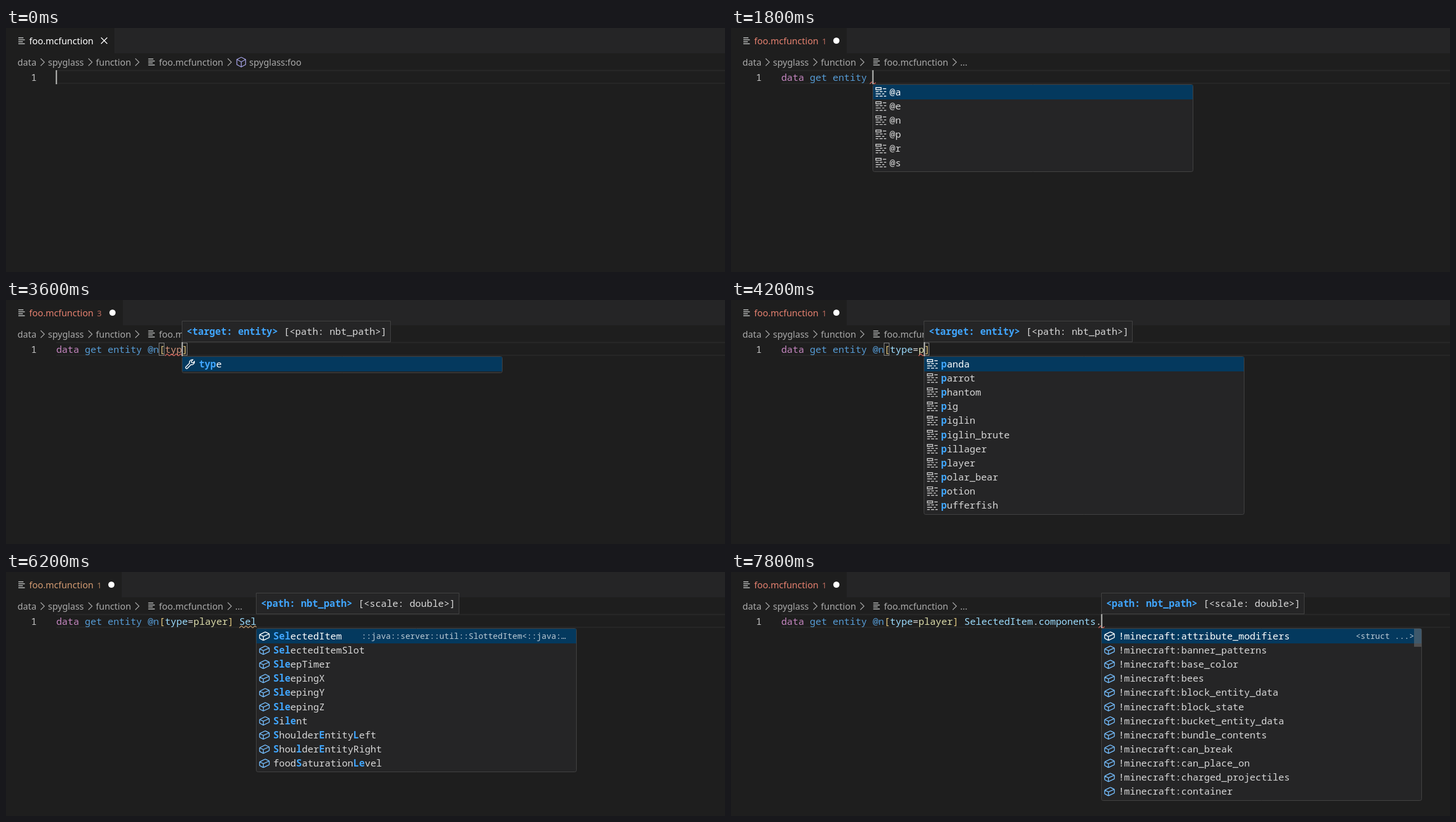
Write an HTML page with a canvas that moves like this. It is 1280 by 434 pixels and loops after 8000 ms.

```html
<!DOCTYPE html>
<html lang="en">
<head>
<meta charset="utf-8">
<title>Command completion</title>
<style>
html, body { margin: 0; width: 100%; height: 100%; overflow: hidden; background: #1e1e1e; }
canvas { display: block; width: 1280px; height: 434px; }
</style>
</head>
<body>
<canvas id="stage" width="1280" height="434"></canvas>
<script>
const ctx = document.getElementById('stage').getContext('2d');
const STEP = 200, LOOP = 8000;
const LEFT = 89.4, ADV = 10.183, ROW = 25.14;
const UI = '"Noto Sans", "Open Sans", sans-serif';
const MONO = '"Noto Sans Mono", "DejaVu Sans Mono", monospace';
const CODE = `16.97px ${MONO}`, BOLD = `bold 16.97px ${MONO}`;
const HIT = '#40a6ff', PLAIN = '#d8d8d8', RED = '#e4806f', AMBER = '#d39b72';
const colX = c => LEFT + c * ADV;

// Syntax colours: each applies up to the given column.
const SPANS = [
  [4, '#c586c0'], [18, '#569cd6'], [19, '#e3c87f'], [23, '#9cdcfe'],
  [24, PLAIN], [30, '#dcdcaa'], [31, '#e3c87f'], [99, '#9cdcfe']
];

const words = s => s.split(' ');
const TARGET = ['<target: entity>', ' [<path: nbt_path>]'];
const PATH = ['[<path: nbt_path>]', ''];
const SCALE = ['<path: nbt_path>', ' [<scale: double>]'];
const SUBS = ['(get|merge|modify|remove)', '(block|entity|storage)'];
const SELECTORS = words('@a @e @n @p @r @s');
const MARKED = SELECTORS.map(s => '*@*' + s[1]);
const KEYS = words('advancements distance dx dy dz gamemode level limit name nbt predicate scores');
const MOBS = words('acacia_boat allay area_effect_cloud armadillo armor_stand arrow axolotl bat bee blaze block_display bogged');
const FIELDS = words('AbsorptionAmount Air Brain CustomName DataVersion DeathTime Dimension EnderItems FallDistance FallFlying Fire Glowing');
const ITEM = words('id Slot components count');
const PARTS = words('attribute_modifiers banner_patterns base_color bees block_entity_data block_state bucket_entity_data bundle_contents can_break can_place_on charged_projectiles container').map(s => '!minecraft:' + s);

const E = 'data get entity ', P = E + '@n[type=player]', I = P + ' SelectedItem';
const bad = { tone: RED, n: 1 };
const warn = { tone: AMBER, n: 1, waveTone: '#c8a070' };
const st = (text, more) => ({ text, caret: text.length, blink: true, dirty: true, ...more });
const inside = (body, more) => st(E + '@n[' + body + ']', { caret: 19 + body.length, pair: true, tip: TARGET, ...more });
const keyword = (text, rows, more) => st(text, { ...bad, icon: 'keyword', rows: words(rows), ...more });
const done = more => st(P, { caret: 30, tip: TARGET, pair: true, ...more });
const field = (text, rows, more) => st(text, { tip: SCALE, icon: 'field', rows, ...more });
const itemStep = (sel, more) => field(I + '.', ITEM, { ...bad, sel, wave: [45, 45], ...more });

const STATES = [
  st('', { dirty: false }),
  keyword('d', '*d*amage *d*ata *d*atapack *d*ebug *d*efaultgamemode *d*eop *d*ifficulty', { wave: [0, 1], raw: 0 }),
  keyword('da', '*da*mage *da*ta *da*tapack *d*ef*a*ultgamemode', { wave: [0, 2], raw: 0 }),
  keyword('dat', '*dat*a *dat*apack', { wave: [0, 3], raw: 0 }),
  keyword('data', '*data* *data*pack', { wave: [4, 4] }),
  keyword('data ', 'get merge modify remove', { wave: [5, 5], tip: SUBS, tall: true }),
  keyword('data g', '*g*et', { wave: [5, 6], raw: 5, tip: SUBS, tall: true }),
  keyword('data get ', 'block entity storage', { wave: [9, 9] }),
  keyword('data get e', '*e*ntity', { wave: [9, 10], raw: 9 }),
  keyword(E, SELECTORS.join(' '), { wave: [16, 16] }),
  ...[0, 1, 2].map(sel => keyword(E + '@', MARKED.join(' '), { sel, wave: [16, 17], raw: 16 })),
  st(E + '@n', { tip: TARGET }),
  inside('', { icon: 'wrench', rows: KEYS }),
  inside('', { icon: 'wrench', rows: KEYS, blink: false }),
  inside('t', { ...bad, n: 3, icon: 'wrench', rows: words('*t*ag *t*eam *t*ype'), wave: [19, 20], raw: 19, rawTo: 20 }),
  inside('ty', { ...bad, n: 3, icon: 'wrench', rows: ['*ty*pe'], wave: [19, 21], raw: 19, rawTo: 21 }),
  inside('typ', { ...bad, n: 3, icon: 'wrench', rows: ['*typ*e'], wave: [19, 22], raw: 19, rawTo: 22 }),
  inside('type', { ...bad, wave: [23, 23] }),
  inside('type=', { ...bad, icon: 'keyword', rows: MOBS, wave: [24, 24] }),
  inside('type=p', { ...bad, icon: 'keyword', rows: words('*p*anda *p*arrot *p*hantom *p*ig *p*iglin *p*iglin_brute *p*illager *p*layer *p*olar_bear *p*otion *p*ufferfish'), wave: [24, 25] }),
  inside('type=pl', { ...bad, icon: 'keyword', rows: words('*pl*ayer *p*ig*l*in *p*ig*l*in_brute *p*i*l*lager *p*o*l*ar_bear'), wave: [24, 26] }),
  done(),
  done({ blink: false }),
  done({ caret: 31 }),
  st(P + ' ', { ...bad, tip: PATH, wave: [32, 32], blink: false }),
  st(P + ' ', { ...bad, tip: PATH, wave: [32, 32], blink: false }),
  field(P + ' ', FIELDS, { ...bad, tip: PATH, wave: [32, 32] }),
  field(P + ' S', words('*S*core *S*electedItem *S*electedItemSlot *S*houlderEntityLeft *S*houlderEntityRight *S*ilent *S*leepingX *S*leepingY *S*leepingZ *S*leepTimer seenCredit*S* food*S*aturationLevel'), { ...warn, wave: [32, 33] }),
  field(P + ' Se', words('*Se*lectedItem *Se*lectedItemSlot *S*cor*e* *S*l*e*epTimer *S*l*e*epingX *S*l*e*epingY *S*l*e*epingZ *S*il*e*nt *S*houlder*E*ntityLeft *S*houlder*E*ntityRight food*S*aturationL*e*vel'), { ...warn, wave: [32, 34] }),
  field(P + ' Sel', words('*Sel*ectedItem *Sel*ectedItemSlot *Sle*epTimer *Sle*epingX *Sle*epingY *Sle*epingZ *S*i*le*nt *S*houlder*E*ntity*L*eft *S*hou*l*der*E*ntityRight food*S*aturation*Le*vel'), {
    ...warn, wave: [32, 35], blink: false,
    detail: '::java::server::util::SlottedItem<::java:…', detailEnd: 551 }),
  field(I, null),
  field(I, null, { blink: false }),
  itemStep(0),
  itemStep(0, { blink: false }),
  itemStep(1, { detail: '::java::server::util::inventory::T', blink: false }),
  itemStep(2),
  field(I + '.components', null),
  field(I + '.components.', PARTS, { ...bad, wave: [56, 56], detail: '<struct ...>', bar: true })
];

function text(s, x, y, color, font) {
  ctx.font = font;
  ctx.fillStyle = color;
  ctx.fillText(s, x, y);
}

function rect(x, y, w, h, color) {
  ctx.fillStyle = color;
  ctx.fillRect(x, y, w, h);
}

function line(color, width, ...pts) {
  ctx.strokeStyle = color;
  ctx.lineWidth = width;
  ctx.beginPath();
  for (let i = 0; i < pts.length; i += 2) ctx.lineTo(pts[i], pts[i + 1]);
  ctx.stroke();
}

function panel(x, y, w, h, r) {
  ctx.beginPath();
  ctx.roundRect(Math.floor(x) + 0.5, y + 0.5, Math.round(w) - 1, h - 1, r);
  ctx.fillStyle = '#252526';
  ctx.fill();
  ctx.strokeStyle = '#454545';
  ctx.lineWidth = 1;
  ctx.stroke();
}

function fileIcon(x, y) {
  [9, 11.5, 8, 11.5].forEach((w, i) => rect(x, y + i * 3.5, w, 1.4, '#cfd2d1'));
}

// Icons live on a 16 unit grid.
const ICONS = {
  field: new Path2D('M9.4 2.3L14.2 4.6Q14.7 4.9 14.7 5.4V9.4Q14.7 9.9 14.2 10.2L7 13.6Q6.5 13.8 6 13.6L1.8 11.4Q1.3 11.1 1.3 10.6V6.6Q1.3 6.1 1.8 5.8L8.6 2.4Q9 2.1 9.4 2.3M1.5 6.1L6.5 8.5L14.5 4.9M6.5 8.5V13.6'),
  keyword: new Path2D('M1.2 1.8H8.6V4.6H1.2ZM11 3.2H15.6M1 7.3H5M6.6 7.3H10.4M12.6 7.3H15.6M1 10.5H8M10 10.5H13M1 13.7H4.6M6.4 13.7H10.6M12.4 13.7H15.6'),
  wrench: new Path2D('M11.8 1.9L9.8 4L10.2 5.8L12 6.2L14.1 4.2A4 4 0 0 1 9.2 8.8L4.2 13.9A1.5 1.5 0 0 1 2.1 11.8L7.2 6.8A4 4 0 0 1 11.8 1.9Z')
};

function icon(name, x, y, color) {
  ctx.save();
  ctx.translate(x, y);
  ctx.scale(1.28, 1.28);
  ctx.strokeStyle = color;
  ctx.lineWidth = 1.15;
  ctx.stroke(ICONS[name]);
  ctx.restore();
}

function drawTab(s) {
  const shift = s.n > 1 ? 2 : 0;
  rect(0, 0, 1280, 45, '#252526');
  rect(0, 0, s.n ? 206 + shift : 193, 45, '#1e1e1e');
  fileIcon(22, 16.8);
  text('foo.mcfunction', 41.3, 29, s.tone || '#ffffff', `16.05px ${UI}`);
  if (s.n) {
    ctx.globalAlpha = 0.78;
    text(s.n, 162, 29, s.tone, `14.5px ${UI}`);
    ctx.globalAlpha = 1;
  }
  if (s.dirty) {
    ctx.fillStyle = '#ffffff';
    ctx.beginPath();
    ctx.arc(s.n ? 187.6 + shift : 174.7, 22.5, 5.5, 0, 7);
    ctx.fill();
  } else {
    line('#ffffff', 1.5, 169.2, 17, 180.2, 28);
    line('#ffffff', 1.5, 180.2, 17, 169.2, 28);
  }
}

function drawCrumbs(s) {
  const put = (t, x) => text(t, x, 67, '#a9a9a9', `16.05px ${UI}`);
  put('data', 20.5);
  put('spyglass', 74.8);
  put('function', 160);
  put('foo.mcfunction', 272.3);
  for (const x of [65, 150, 233.5, 398]) line('#a9a9a9', 1.3, x - 3.3, 54.3, x + 3.3, 60.8, x - 3.3, 67.3);
  fileIcon(253.3, 54.5);
  if (s.dirty) return put('...', 408);
  put('spyglass:foo', 433);
  const c = '#a3a0e2';
  line(c, 1.4, 418.8, 52, 426.5, 56, 426.5, 65, 418.8, 69.3, 411, 65, 411, 56, 418.8, 52);
  line(c, 1.4, 411, 56, 418.8, 60.3, 426.5, 56);
  line(c, 1.4, 418.8, 60.3, 418.8, 69.3);
}

function codeColor(s, c) {
  const ch = s.text[c];
  if (ch === ']') return '#e3c87f';
  if (c > 31 && ch === '.') return PLAIN;
  if (c >= s.raw && c < (s.rawTo || 99)) return s.rawTo ? '#ce9178' : PLAIN;
  return SPANS.find(p => c < p[0])[1];
}

function drawWave([from, to], color) {
  const pad = from === to ? 5.3 : 0;
  const a = colX(from) - pad, b = colX(to) + pad;
  ctx.strokeStyle = color;
  ctx.lineWidth = 1.3;
  ctx.beginPath();
  for (let x = a; x <= b; x += 0.5) ctx.lineTo(x, 97.6 + 1.5 * Math.cos((x - a) * Math.PI / 4));
  ctx.stroke();
}

function drawCode(s) {
  rect(LEFT, 74.6, 1191, 2, '#282828');
  rect(LEFT, 97.4, 1191, 2, '#282828');
  text('1', 44.4, 93.5, '#c6c6c6', CODE);
  if (s.pair) for (const c of [18, s.text.length - 1]) {
    ctx.strokeStyle = '#888888';
    ctx.lineWidth = 1;
    ctx.strokeRect(Math.floor(colX(c)) + 0.5, 76.5, 9, 22);
  }
  for (let i = 0; i < s.text.length;) {
    const color = codeColor(s, i);
    let j = i + 1;
    while (j < s.text.length && codeColor(s, j) === color) j++;
    text(s.text.slice(i, j), colX(i), 93.5, color, CODE);
    i = j;
  }
  if (s.wave) drawWave(s.wave, s.waveTone || '#e0685f');
  if (s.blink) rect(colX(s.caret) - 0.9, 75, 2.4, 25, '#aeafad');
}

function drawTip(s) {
  const x = colX(s.caret), [head, tail] = s.tip;
  const w = s.tall ? 593 : (head + tail).length * ADV + 16;
  const top = s.tall ? 11 : 37;
  panel(x, top, w, 75 - top, 0);
  text(head, x + 8, top + 25, HIT, BOLD);
  if (s.tall) text(tail, x + 8, 62, PLAIN, CODE);
  else text(tail, x + 8 + head.length * ADV, 62, PLAIN, CODE);
}

// Asterisks toggle the matched part of a label.
function drawLabel(label, x, y, color) {
  label.split('*').forEach((part, i) => {
    text(part, x, y, i % 2 ? HIT : color, i % 2 ? BOLD : CODE);
    x += part.length * ADV;
  });
}

function drawList(s) {
  const x = colX(s.caret), edge = Math.floor(x), sel = s.sel || 0;
  panel(x, 100, 571, Math.round(s.rows.length * ROW + 5), 3);
  s.rows.forEach((label, i) => {
    const y = 101.2 + i * ROW, on = i === sel;
    if (on) rect(edge + 1, Math.round(y), 569, 26, '#04395e');
    const tint = on ? '#ffffff' : s.icon === 'field' ? '#75beff' : '#d0d0d0';
    icon(s.icon, x + 4, y + 2.6, tint);
    drawLabel(label, x + 30, y + 18.6, on ? '#ffffff' : PLAIN);
    if (on && s.detail) {
      ctx.textAlign = 'right';
      text(s.detail, x + (s.detailEnd || 556.5), y + 17.8, '#bccbd6', `14.45px ${MONO}`);
      ctx.textAlign = 'left';
    }
  });
  if (s.bar) rect(edge + 557, 101, 13, 32, 'rgba(121,121,121,0.5)');
}

function frame(now) {
  const s = STATES[Math.floor(now % LOOP / STEP)];
  rect(0, 0, 1280, 434, '#1e1e1e');
  drawTab(s);
  drawCrumbs(s);
  drawCode(s);
  if (s.tip) drawTip(s);
  if (s.rows) drawList(s);
}

const start = performance.now();
function tick() {
  frame(performance.now() - start);
  requestAnimationFrame(tick);
}
tick();
</script>
</body>
</html>
```
